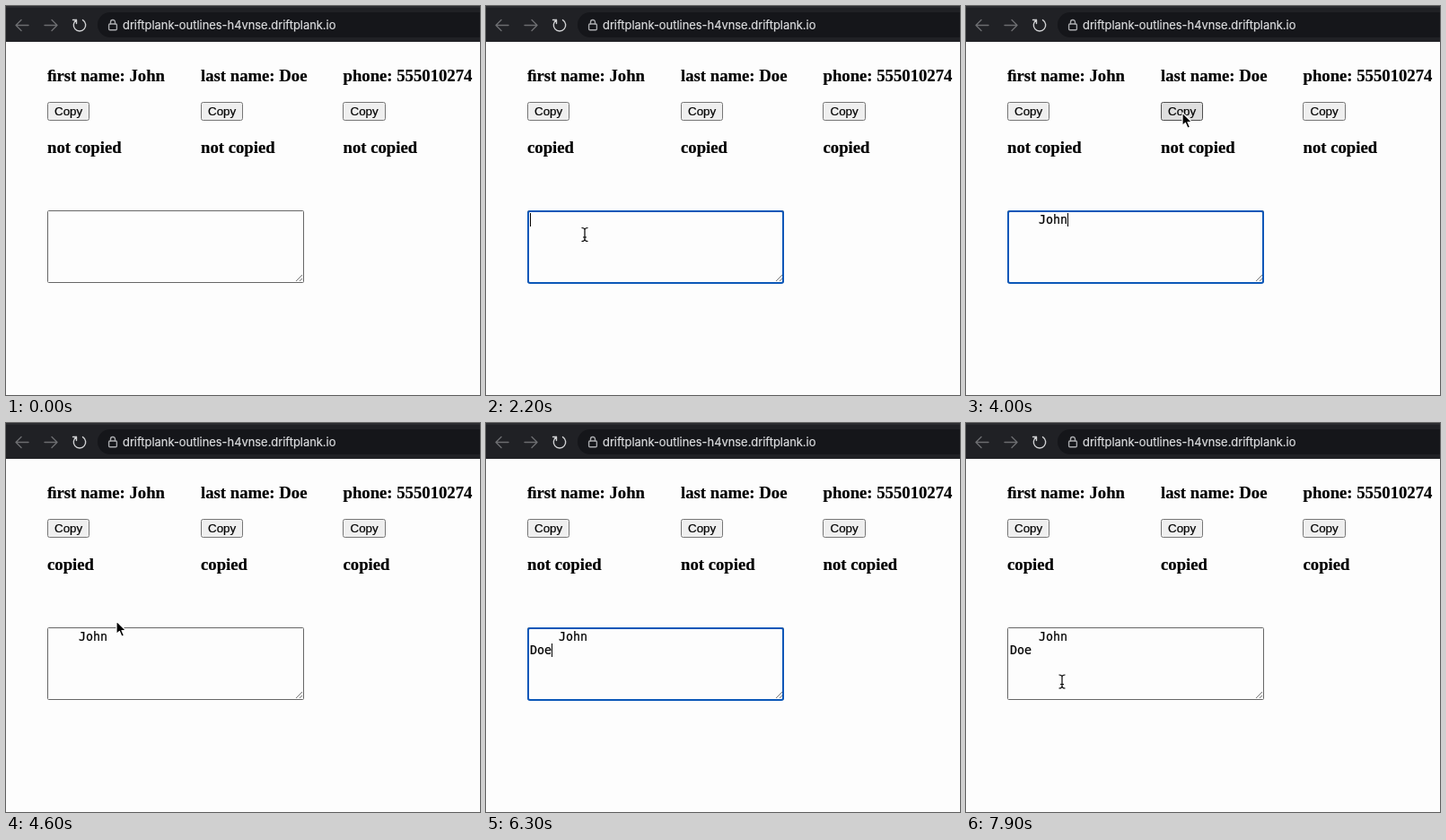
These frames come from a looping animation (528 px wide and 434 px high, 8000 ms). An HTML page:

```html
<!DOCTYPE html>
<html lang="en">
<head>
<meta charset="utf-8">
<title>Copy buttons</title>
<style>
  html, body { margin: 0; width: 100%; height: 100%; overflow: hidden; background: #fdfdfd; }
  svg { display: block; }
  text { stroke: #000; stroke-width: .2; }
  .url { font: 12.9px Inter, sans-serif; fill: #dcdddf; stroke: #dcdddf; }
  .heading { font: bold 18.72px "Liberation Serif", serif; }
  .label { font: 13.33px "Liberation Sans", sans-serif; }
  .mono { font: 13.33px "DejaVu Sans Mono", monospace; }
  .icon { fill: none; stroke-width: 1.4; stroke-linecap: round; stroke-linejoin: round; }
  .button { fill: #efefef; stroke: #767676; }
  .button.hover { fill: #dedede; stroke: #4f4f4f; }
  .area { fill: #fdfdfd; stroke: #666; }
  .ring { fill: none; stroke: #0b57b8; stroke-width: 2; }
</style>
</head>
<body>
<svg width="528" height="434" viewBox="0 0 528 434">
  <rect width="528" height="40" fill="#202125"/>
  <rect width="528" height="2" fill="#2b2c30"/>
  <rect x="102" y="7" width="460" height="28" rx="14" fill="#15161a"/>
  <g class="icon" stroke="#6c6d70">
    <path d="M25 21.5H11M17 15.5l-6 6 6 6"/>
    <path d="M43 21.5h14M51 15.5l6 6-6 6"/>
  </g>
  <path class="icon" stroke="#d0d1d3" d="M78.5 15.6A6.7 6.7 0 1 0 85.5 15.6M78.5 19.5v-4h-4"/>
  <g class="icon" stroke="#a9aaad">
    <rect x="114.6" y="20" width="8.8" height="6.8" rx="1.2"/>
    <path d="M116.5 20v-2a2.5 2.5 0 0 1 5 0v2"/>
  </g>
  <text class="url" x="130" y="26">driftplank-outlines-h4vnse.driftplank.io</text>

  <g id="columns"></g>

  <rect class="area" x="46.5" y="228.5" width="285" height="80" rx="1"/>
  <path d="M323 307l7-7M327 307l3-3" stroke="#777" fill="none"/>
  <rect id="ring" class="ring" x="47" y="229" width="284" height="80" rx="2"/>
  <text id="line1" class="mono" x="81" y="243">John</text>
  <text id="line2" class="mono" x="49" y="258">Doe</text>
  <rect id="caret" width="1" height="15"/>

  <path id="arrow" d="M0 0V14.5L3.4 11.4 5.9 17.2 8.5 16 6 10.5H10.6Z"
    stroke="#fff" stroke-width="1.2" stroke-linejoin="round"/>
  <path id="beam" d="M-3.5 -7.5Q0 -7.5 0 -5V5Q0 7.5 -3.5 7.5M3.5 -7.5Q0 -7.5 0 -5M0 5Q0 7.5 3.5 7.5M-2 3H2"
    fill="none" stroke="#000" stroke-width="1.2"/>
</svg>
<script>
const LOOP = 8000, STEP = 100, BLINK = 500, RESET = 1500;
const BUTTON_WIDTH = 47, CHAR = 8, TEXT_LEFT = 49;
const $ = id => document.getElementById(id);
const show = (el, on) => { el.style.visibility = on ? "visible" : "hidden"; };
const within = (v, from, to) => v >= from && v < to;

const columns = [
  { x: 46, title: "\uFB01rst name: John" },
  { x: 217, title: "last name: Doe" },
  { x: 375.5, title: "phone: 555010274" }
];
$("columns").innerHTML = columns.map(({ x, title }) => {
  const left = Math.floor(x), right = Math.ceil(x + BUTTON_WIDTH);
  return `
    <text class="heading" x="${x}" y="84">${title}</text>
    <rect class="button" x="${left + .5}" y="107.5" width="${right - left - 1}" height="20" rx="2"/>
    <text class="label" x="${x + 8}" y="122">Copy</text>
    <text class="heading status" x="${x}" y="164"></text>`;
}).join("");
const buttons = document.querySelectorAll(".button");
const statuses = document.querySelectorAll(".status");

const moves = [
  { from: 100, to: 200, x: 399, y: 26 },
  { from: 400, to: 1000, x: 67.5, y: 116 },
  { from: 1200, to: 1700, x: 110, y: 255 },
  { from: 2400, to: 3000, x: 112, y: 239 },
  { from: 3300, to: 3900, x: 241, y: 119 },
  { from: 4200, to: 4600, x: 123, y: 221 },
  { from: 4600, to: 5200, x: 129.5, y: 236 },
  { from: 6900, to: 7300, x: 407.5, y: 121 },
  { from: 7400, to: 7900, x: 107, y: 288.5 }
];
const clicks = [1100, 4200, 7400];
const focus = 1900, pasteFirst = 2800, refocus = 5100, newline = 5800, pasteLast = 6300;
const edits = [focus, pasteFirst, refocus, newline, pasteLast];

const ease = k => k * k * (3 - 2 * k);

function pointerAt(t) {
  let x = 143, y = 97;
  for (const m of moves) {
    const k = ease(Math.min(1, Math.max(0, (t - m.from) / (m.to - m.from))));
    x += (m.x - x) * k;
    y += (m.y - y) * k;
  }
  return [x, y];
}

function overText(x, y) {
  const inArea = within(x, 46, 332) && within(y, 228, 309);
  const inAddress = x > 125 && within(y, 7, 35);
  const inHeading = within(y, 68, 89) || within(y, 148, 169);
  return inArea || inAddress || (inHeading && columns.some(c => within(x, c.x, c.x + 82)));
}

function drawPointer(t) {
  const [x, y] = pointerAt(t);
  const visible = t >= 100 && !within(t, newline, 7000);
  const beam = overText(x, y);
  show($("arrow"), visible && !beam);
  show($("beam"), visible && beam);
  for (const id of ["arrow", "beam"]) $(id).setAttribute("transform", `translate(${x} ${y})`);
  columns.forEach((c, i) => buttons[i].classList.toggle("hover",
    visible && within(x, c.x, c.x + BUTTON_WIDTH) && within(y, 107, 128)));
}

function drawField(t) {
  const focused = within(t, focus, clicks[1]) || within(t, refocus, clicks[2]);
  const lastEdit = edits.filter(e => e <= t).pop();
  const secondLine = t >= newline;
  const column = t >= pasteLast ? 3 : !secondLine && t >= pasteFirst ? 8 : 0;
  show($("ring"), focused);
  show($("line1"), t >= pasteFirst);
  show($("line2"), t >= pasteLast);
  show($("caret"), focused && Math.floor((t - lastEdit) / BLINK) % 2 === 0);
  $("caret").setAttribute("x", TEXT_LEFT + column * CHAR);
  $("caret").setAttribute("y", secondLine ? 246 : 231);
}

function draw(t) {
  const copied = clicks.some(c => within(t, c, c + RESET));
  statuses.forEach(s => { s.textContent = copied ? "copied" : "not copied"; });
  drawPointer(t);
  drawField(t);
}

function frame() {
  const t = performance.now() % LOOP;
  draw(Math.floor(t / STEP) * STEP);
  requestAnimationFrame(frame);
}
frame();
</script>
</body>
</html>
```
